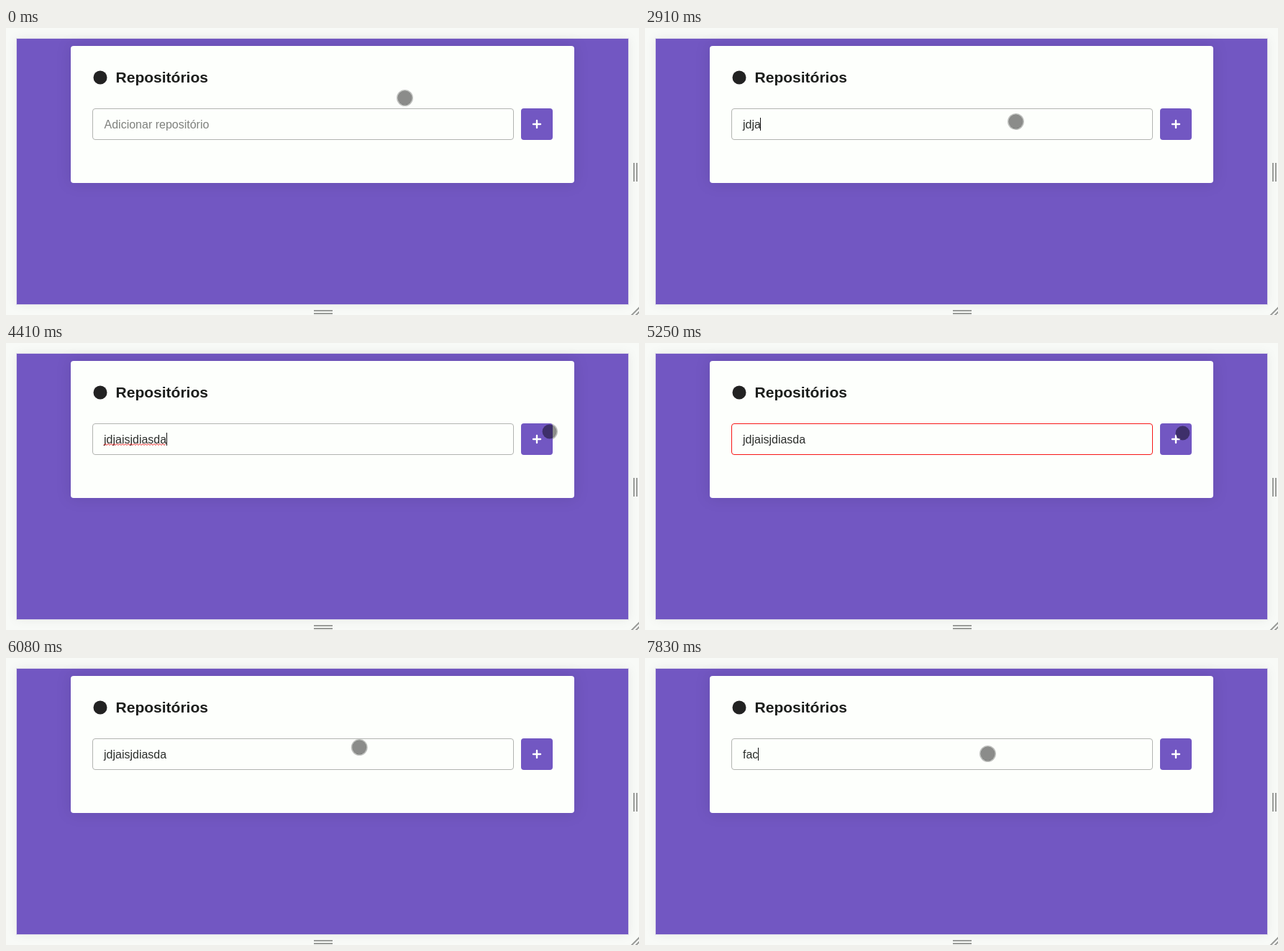
Recreate the animation shown at these times as an HTML page. Size 880 by 400 pixels, loop 8000 ms.

```html
<!DOCTYPE html>
<html lang="pt">
<head>
<meta charset="utf-8">
<style>
html, body { margin: 0; width: 880px; height: 400px; overflow: hidden; background: #f8faf7; }
svg { display: block; font: 16px "Liberation Sans", Arial, sans-serif; }
.panel { fill: #7257c2; filter: drop-shadow(0 0 7px rgba(0,0,0,.07)); }
.card { fill: #fdfffc; filter: drop-shadow(0 0 10px rgba(0,0,0,.1)); }
.handle { stroke: #999b98; stroke-width: 2; }
</style>
</head>
<body>
<svg width="880" height="400">
  <rect class="panel" x="15" y="15" width="850" height="370"/>
  <rect x="14.5" y="14.5" width="851" height="371" fill="none" stroke="#dcd9e8"/>
  <path class="handle" fill="none" d="M873 188v26M877 188v26M428 394h26M428 398h26M868 402L882 388M874 402L882 394"/>
  <rect class="card" x="90" y="25" width="700" height="191" rx="4"/>
  <circle cx="131" cy="69" r="9.5" fill="#222"/>
  <text x="152.6" y="76" fill="#1c1e1c" font-size="21" font-weight="bold">Repositórios</text>
  <rect id="field" x="120.5" y="112.5" width="585" height="43" rx="3.5" fill="none"/>
  <rect id="mark" x="136" y="125" width="87" height="18" fill="#3297fd"/>
  <text id="hint" x="136.5" y="140" fill="#7f817e">Adicionar repositório</text>
  <text id="value" x="136" y="140"></text>
  <path id="wave" fill="none" stroke="#f01818"/>
  <rect id="caret" y="125" width="1" height="18" fill="#111"/>
  <circle id="ring" r="10.6" fill="none" stroke="#bec0bd" stroke-width="1.8"/>
  <rect x="716" y="112" width="44" height="44" rx="4" fill="#7257c2"/>
  <path d="M733 134h10M738 129v10" stroke="#fff" stroke-width="2.4" stroke-linecap="round"/>
  <circle id="disc" r="9.9" fill="#000" fill-opacity=".45"/>
</svg>
<script>
// all times below are in ticks
const RATE = 12, TICKS = 96;
const $ = id => document.getElementById(id);
const [field, mark, hint, value, wave, caret, ring, disc] =
  ["field", "mark", "hint", "value", "wave", "caret", "ring", "disc"].map($);

const origin = { x: 554.5, y: 97.5 };
const moves = [
  { from: 17, to: 22, x: 515.5, y: 130.5, power: 1, lift: 0 },
  { from: 47, to: 53, x: 755.5, y: 123.5, power: 2, lift: 20 },
  { from: 53, to: 57, x: 747.5, y: 125.5, power: 2, lift: 0 },
  { from: 67, to: 75, x: 476.5, y: 133.5, power: 2.1, lift: 11.4 }
];
const typing = [{ start: 32, word: "jdjaisjdiasda" }, { start: 92, word: "fac" }];
const focus = [{ from: 27, to: 61 }, { from: 81, to: TICKS }];

const within = (k, a, b) => k >= a && k < b;
const show = (el, on) => el.setAttribute("visibility", on ? "visible" : "hidden");

// each move eases out along a shallow arc
function pointerAt(k) {
  let { x, y } = origin;
  for (const m of moves) {
    const u = Math.min(1, Math.max(0, (k - m.from) / (m.to - m.from)));
    const e = 1 - (1 - u) ** m.power;
    x += (m.x - x) * e;
    y += (m.y - y) * e - 4 * m.lift * u * (1 - u);
  }
  return { x, y };
}

// typing gathers speed
function textAt(run, k) {
  const n = k - run.start + 1;
  return run.word.slice(0, Math.floor(n + n * n / 20));
}

function caretAt(k, run) {
  const active = focus.find(f => within(k, f.from, f.to));
  if (!active) return false;
  const busy = run && k - run.start < run.word.length;
  return busy || (k - active.from) % RATE < RATE / 2;
}

let zigzag = "M136 142.5";
for (let x = 138; x <= 223; x += 2) zigzag += `L${x} ${x % 4 ? 140.5 : 142.5}`;
wave.setAttribute("d", zigzag);

function draw(k) {
  const run = typing.findLast(r => r.start <= k);
  const text = run ? textAt(run, k) : "";
  const selected = within(k, 86, 92), error = within(k, 62, 69);
  value.textContent = text;
  value.setAttribute("fill", selected ? "#fff" : "#2c2e2c");
  caret.setAttribute("x", 136 + Math.floor(text ? value.getComputedTextLength() : 0));
  show(hint, !text);
  show(mark, selected);
  show(wave, within(k, 49, 61));
  show(caret, caretAt(k, run));
  field.setAttribute("stroke", error ? "#f81616" : "#b2b4b1");
  const { x, y } = pointerAt(k);
  for (const c of [ring, disc]) {
    c.setAttribute("cx", x);
    c.setAttribute("cy", y);
  }
}

const began = performance.now();
function frame() {
  // a small lead keeps ticks in step with times rounded down to 10 ms
  const t = (performance.now() - began) % (TICKS / RATE * 1000) + 7;
  draw(Math.min(Math.floor(t * RATE / 1000), TICKS - 1));
  requestAnimationFrame(frame);
}
frame();
</script>
</body>
</html>
```
